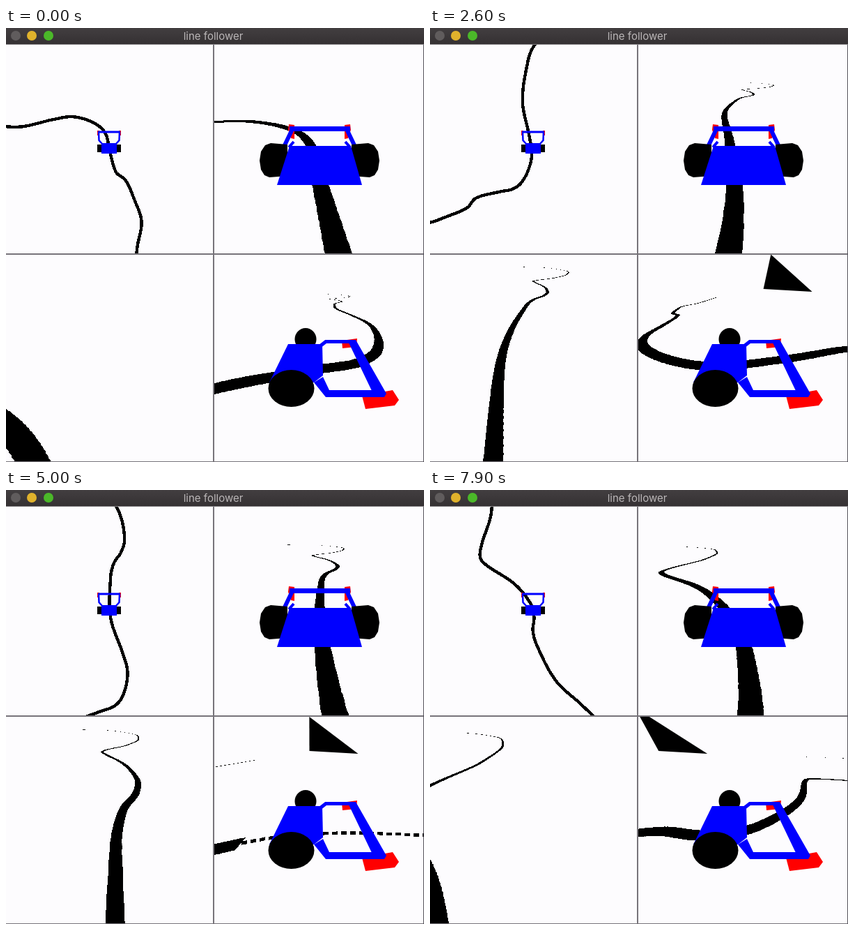
An HTML page with a canvas that plays this animation: 600 px wide and 622 px high, repeating every 8 s.

```html
<!DOCTYPE html>
<html lang="en">
<head>
<meta charset="utf-8">
<title>line follower</title>
<style>
html, body { margin: 0; width: 100%; height: 100%; overflow: hidden; background: #fdfcfe; }
canvas { display: block; position: absolute; top: 0; left: 0; }
header {
  position: absolute; top: 0; left: 0; width: 600px; height: 23px;
  background: linear-gradient(#423e40, #353133); border-bottom: 1px solid #858285; color: #bbb7b8;
  font: 15px/23px Inter, Roboto, sans-serif; text-align: center; text-indent: -5px;
}
header i { position: absolute; top: 3.5px; width: 14px; height: 14px; border-radius: 50%; }
</style>
</head>
<body>
<canvas id="stage" width="600" height="622"></canvas>
<header>
  <i style="left:7px;background:#605c5d"></i>
  <i style="left:30px;background:#e0b22c"></i>
  <i style="left:54px;background:#4bb829"></i>
  line follower
</header>
<script>
const W = 600, H = 622, LOOP = 8000, STEP = 100;
const BLUE = '#00f', RED = '#f00', BLACK = '#000';
const PAPER = 0xfffefcfd, INK = 0xff000000;
const ctx = document.getElementById('stage').getContext('2d');
const image = ctx.createImageData(W, H);
const pixels = new Uint32Array(image.data.buffer);

// Bends of the track seen from above, y down; the car sets off at START
const START = [-13, 143];
const bends = [
  [-400, 250], [-160, 201], [-112, 202], [-82, 188], [-56, 172], [-46, 157], START,
  [4, 137], [15, 127], [23, 107], [25, 84], [18, 59], [1, 9], [1, -50], [6, -70], [16, -85],
  [21, -104], [14, -140], [-9, -183], [-12, -197], [-2, -212], [34, -249], [80, -340],
  [95, -500], [-40, -760], [-400, -850]
];
const headings = [[0, 83], [1400, 24], [2600, -8], [3500, -27], [5000, 0], [6200, -1], [7900, 28]];
const SPEED = .0335, DRIFT = 100;

// Smooth curve through keys of the form [position, ...values]
function spline(keys, t) {
  let i = 0;
  while (i < keys.length - 2 && keys[i + 1][0] <= t) i++;
  const a = keys[i], b = keys[i + 1], before = keys[i - 1], after = keys[i + 2];
  const span = b[0] - a[0], u = (t - a[0]) / span, v = u * u, w = v * u;
  const slope = (p, q, k) => p && q ? (q[k] - p[k]) / (q[0] - p[0]) * span : 0;
  return a.slice(1).map((_, j) => {
    const k = j + 1;
    return (2 * w - 3 * v + 1) * a[k] + (w - 2 * v + u) * slope(before, b, k)
      + (3 * v - 2 * w) * b[k] + (w - v) * slope(a, after, k);
  });
}

// Track keyed by distance, zero at START
let run = 0;
const track = bends.map((p, i) => {
  if (i) run += Math.hypot(p[0] - bends[i - 1][0], p[1] - bends[i - 1][1]);
  return [run, ...p];
});
const origin = track[bends.indexOf(START)][0];
track.forEach(key => key[0] -= origin);

// The car keeps to the track, drifting outwards in turns
function poseAt(t) {
  const [heading] = spline(headings, t);
  const rate = (spline(headings, t + 5)[0] - spline(headings, t - 5)[0]) / 10;
  const angle = heading * Math.PI / 180;
  const [x, y] = spline(track, t * SPEED);
  const off = -DRIFT * rate;
  return { x: x + off * Math.cos(angle), y: y + off * Math.sin(angle), heading, angle };
}

// Track bitmap, sampled by every camera
const SCALE = 2, LEFT = -430, TOP = -880, MW = 1200, MH = 2300;
const map = makeMap();

function makeMap() {
  const c = document.createElement('canvas');
  c.width = MW; c.height = MH;
  const g = c.getContext('2d', { willReadFrequently: true });
  g.scale(SCALE, SCALE);
  g.translate(-LEFT, -TOP);
  g.lineWidth = 4.4;
  g.lineJoin = 'round';
  g.beginPath();
  for (let s = track[0][0]; s < track[track.length - 1][0]; s += 2) g.lineTo(...spline(track, s));
  g.stroke();
  const data = g.getImageData(0, 0, MW, MH).data;
  return Uint8Array.from({ length: MW * MH }, (_, i) => data[i * 4 + 3]);
}

function onTrack(x, y) {
  const u = (x - LEFT) * SCALE - .5, v = (y - TOP) * SCALE - .5;
  const i = Math.floor(u), j = Math.floor(v);
  if (i < 0 || j < 0 || i > MW - 2 || j > MH - 2) return false;
  const n = j * MW + i, p = u - i, q = v - j;
  return (map[n] * (1 - p) + map[n + 1] * p) * (1 - q)
    + (map[n + MW] * (1 - p) + map[n + MW + 1] * p) * q > 127;
}

function drawGround({ x: px, y: py, angle }) {
  const sin = Math.sin(angle), cos = Math.cos(angle);
  // X to the right of the car, Y ahead of it
  const dark = (X, Y) => onTrack(px + X * cos + Y * sin, py + X * sin - Y * cos);
  const panel = (x0, y0, x1, y1, test) => {
    for (let y = y0; y < y1; y++)
      for (let x = x0; x < x1; x++)
        if (test(x + .5, y + .5)) pixels[y * W + x] = INK;
  };
  pixels.fill(PAPER);
  panel(0, 23, 297, 323, (x, y) => dark(x - 148, 172 - y));
  panel(299, 74, 599, 323, (x, y) => {
    const d = 4700 / (y - 73);
    return dark((x - 448.5) * d / 164, d - 33);
  });
  panel(0, 335, 297, H, (x, y) => {
    const d = 7630 / (y - 334);
    return dark((x - 148.5) * d / 170, d + 6.5);
  });
  // Seen square on, the track breaks up into dashes
  const broken = Math.abs(angle) < .05;
  panel(299, 378, 599, H, (x, y) => {
    const d = 4180 / (y - 377), X = 37 - d, Y = (x - 448.5) * d / 150 + 2;
    return broken && Y > -22
      ? x % 13 < 8 && dark(X - 1.5, Y) && dark(X + 1.5, Y)
      : dark(X, Y);
  });
  ctx.putImageData(image, 0, 0);
}

function poly(color, ...p) {
  ctx.fillStyle = color;
  ctx.beginPath();
  for (let i = 0; i < p.length; i += 2) ctx.lineTo(p[i], p[i + 1]);
  ctx.fill();
}

function line(color, width, ...p) {
  ctx.strokeStyle = color;
  ctx.lineWidth = width;
  ctx.beginPath();
  for (let i = 0; i < p.length; i += 2) ctx.lineTo(p[i], p[i + 1]);
  ctx.stroke();
}

function rect(color, ...box) {
  ctx.fillStyle = color;
  ctx.fillRect(...box);
}

function ellipse(x, y, rx, ry) {
  ctx.fillStyle = BLACK;
  ctx.beginPath();
  ctx.ellipse(x, y, rx, ry, 0, 0, 7);
  ctx.fill();
}

function clipped(x, y, w, h, draw) {
  ctx.save();
  ctx.beginPath();
  ctx.rect(x, y, w, h);
  ctx.clip();
  draw();
  ctx.restore();
}

// Dark wedges above the horizon swing with the heading
function drawWedges({ heading, y }) {
  const x = 436 - 3 * heading + y / 4, lean = x - 436;
  const top = x + lean / 4, wide = Math.max(0, Math.abs(lean) - 40) / 5;
  clipped(299, 325, 300, 297, () => poly(BLACK, top, 325, top + wide, 325, x + 70, 378, x, 374));
  const s = 4 * (heading + 27);
  clipped(299, 23, 300, 300, () => poly(BLACK, 331 - s, 77, 250 - s, 46, 250 - s, 78));
  clipped(0, 325, 297, 297, () => poly(BLACK, 13 - s, 344, -48 - s, 309, -48 - s, 345));
}

function topCar() {
  for (const side of [-1, 1]) {
    const x = v => 148 + side * v;
    rect(RED, x(15.5) - 1.5, 147, 3, 7);
    line(BLUE, 2.5, x(15), 149, x(14.5), 161, x(10), 166);
    rect(BLACK, x(14) - 3, 167, 6, 11);
  }
  rect(BLUE, 132, 147.5, 32, 3);
  rect(BLUE, 137, 165, 22, 15);
}

function chaseCar() {
  for (const side of [-1, 1]) {
    const p = (...a) => a.map((v, i) => i % 2 ? v : 450 + side * v);
    poly(RED, ...p(36, 139, 44, 138, 45, 146, 41, 158, 36, 159));
    line(BLUE, 6, ...p(39, 145, 50, 168));
    line(BLUE, 4, ...p(37, 163, 44, 171));
    poly(BLACK, ...p(46, 167, 70, 165, 78, 168, 84, 177, 86, 190, 84, 203, 79, 211, 72, 214, 46, 212));
  }
  rect(BLUE, 407, 141, 87, 7);
  poly(BLUE, 407, 169, 495, 169, 511, 225, 389, 225);
}

function sideCar() {
  ellipse(430, 446, 15.5, 16);
  poly(RED, 482, 448, 504, 445, 503, 457, 483, 459);
  poly(RED, 511, 527, 555, 519, 564, 533, 558, 541, 516, 546);
  poly(BLUE, 405, 453, 454, 453, 455, 498, 442, 508, 378, 508);
  line(BLUE, 5, 452, 455, 459, 449.5, 498, 449.5);
  poly(BLUE, 490, 447, 502, 447, 546, 524, 527, 524);
  poly(BLUE, 442, 508, 455, 500, 464, 519, 527, 519, 546, 524, 543, 529, 459, 529);
  ellipse(409.5, 516.5, 33, 26.5);
}

function frame(now) {
  const pose = poseAt(Math.floor(now % LOOP / STEP) * STEP);
  drawGround(pose);
  drawWedges(pose);
  topCar();
  chaseCar();
  sideCar();
  rect('#77747a', 297, 23, 2, 599);
  rect('#77747a', 0, 323, 600, 2);
  rect('#77747a', 0, 621, 600, 1);
  rect('#55525a', 599, 23, 1, 599);
}

const start = performance.now();
function tick() {
  frame(performance.now() - start);
  requestAnimationFrame(tick);
}
tick();
</script>
</body>
</html>
```
